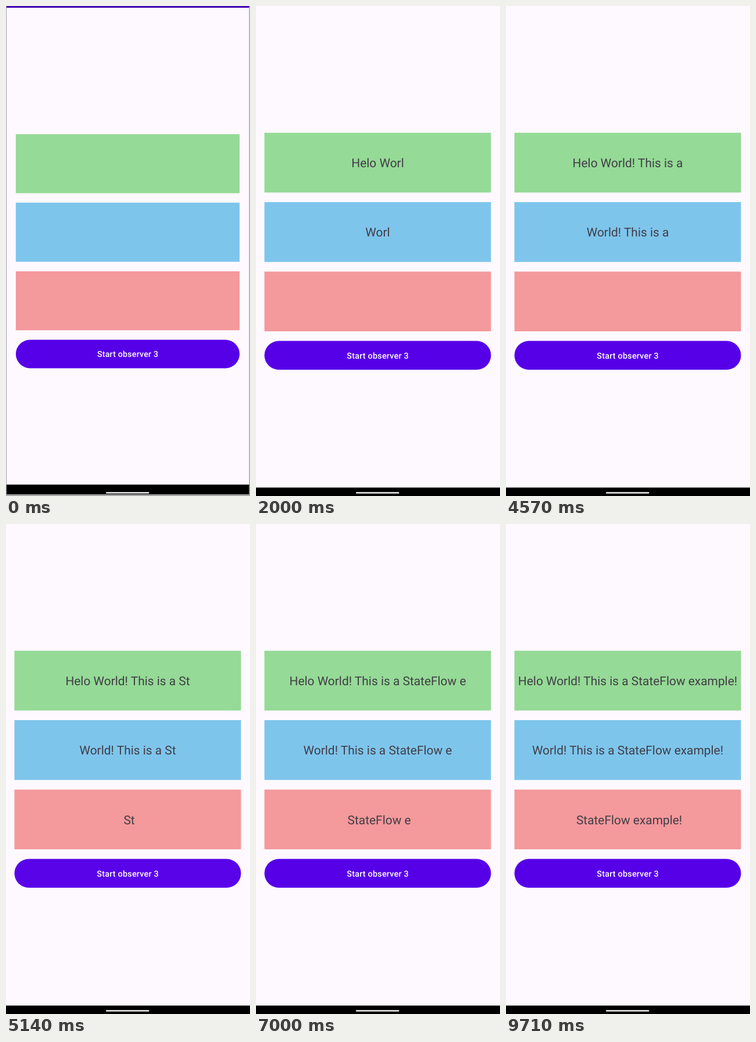
Animation of 420 by 842 pixels, one loop 9.85 s. Source, as an HTML page:

```html
<!DOCTYPE html>
<html lang="en">
<head>
<meta charset="utf-8">
<title>Text observers</title>
<style>
  html, body { margin: 0; width: 100%; height: 100%; overflow: hidden; background: #a3a0a4; }
  svg { display: block; width: 420px; height: 842px; }
  text {
    font-family: Roboto, sans-serif;
    text-anchor: middle;
    text-rendering: geometricPrecision;
    white-space: pre;
  }
  .line { font-size: 20.9px; fill: #413e46; }
  .label { font-size: 14.4px; font-weight: 500; letter-spacing: .2px; fill: #fff; }
</style>
</head>
<body>
<svg viewBox="0 0 420 842">
  <defs>
    <clipPath id="pill"><rect x="14.5" y="575.5" width="390" height="49.5" rx="24.75"/></clipPath>
  </defs>
  <g id="win">
    <rect x="-1.6" y="-40" width="422.7" height="884.3" fill="#fdf9ff"/>
    <rect x="-1.6" y="-40" width="422.7" height="37.9" fill="#4400b4"/>
    <rect x="14.5" y="217.8" width="390" height="102.7" fill="#95da96"/>
    <rect x="14.5" y="337" width="390" height="102.8" fill="#7ec5ec"/>
    <rect x="14.5" y="456.4" width="390" height="102.6" fill="#f4999c"/>
    <text class="line" x="209.5" y="276.9"></text>
    <text class="line" x="209.5" y="396.2"></text>
    <text class="line" x="209.5" y="515.6"></text>
    <g clip-path="url(#pill)">
      <rect x="14" y="575" width="391" height="51" fill="#5600e8"/>
      <circle id="ripple" cx="209.5" cy="600" r="0" fill="#fff" opacity="0"/>
    </g>
    <text class="label" x="209.6" y="605.5">Start observer 3</text>
    <rect x="-1.6" y="827.5" width="422.7" height="16.8"/>
  </g>
  <rect x="172" y="835.3" width="74.5" height="2.4" rx="1.2" fill="#eee"/>
</svg>
<script>
  const LOOP = 9850, FPS = 7;
  const MESSAGE = "Helo World! This is a StateFlow example!";
  const STARTS = [0, 5, 21];            // first character each observer receives
  const TYPE_START = 10, TYPE_STEP = 210;
  const TAP = 4680, RIPPLE = 500;
  const OPEN = 420, OPEN_SCALE = 0.9877;

  const win = document.getElementById("win");
  const ripple = document.getElementById("ripple");
  const lines = [...document.querySelectorAll(".line")];
  const clamp = v => Math.min(1, Math.max(0, v));

  function frameTime(t) {
    let k = Math.ceil(t * FPS / 1000);
    if (Math.round(k * 100 / FPS) * 10 > t) k--;
    return k * 1000 / FPS;
  }

  function draw(t) {
    const count = Math.max(0, Math.floor((t - TYPE_START) / TYPE_STEP));
    lines.forEach((line, i) => {
      let text = MESSAGE.slice(STARTS[i], Math.max(count, STARTS[i]));
      if (i === 1) text = text.trimStart();
      if (line.textContent !== text) line.textContent = text;
    });

    const left = (1 - clamp(t / OPEN)) ** 3;
    const scale = 1 - (1 - OPEN_SCALE) * left;
    win.setAttribute("transform",
      `translate(209.5 415) scale(${scale}) translate(-209.5 -415)`);

    const p = clamp((t - TAP) / RIPPLE);
    ripple.setAttribute("r", 60 + 150 * clamp(p * 2));
    ripple.setAttribute("opacity", p > 0 ? 0.1 * clamp(2 - 2 * p) : 0);
  }

  function tick(now) {
    draw(frameTime(now % LOOP));
    requestAnimationFrame(tick);
  }
  draw(0);
  requestAnimationFrame(tick);
</script>
</body>
</html>
```
